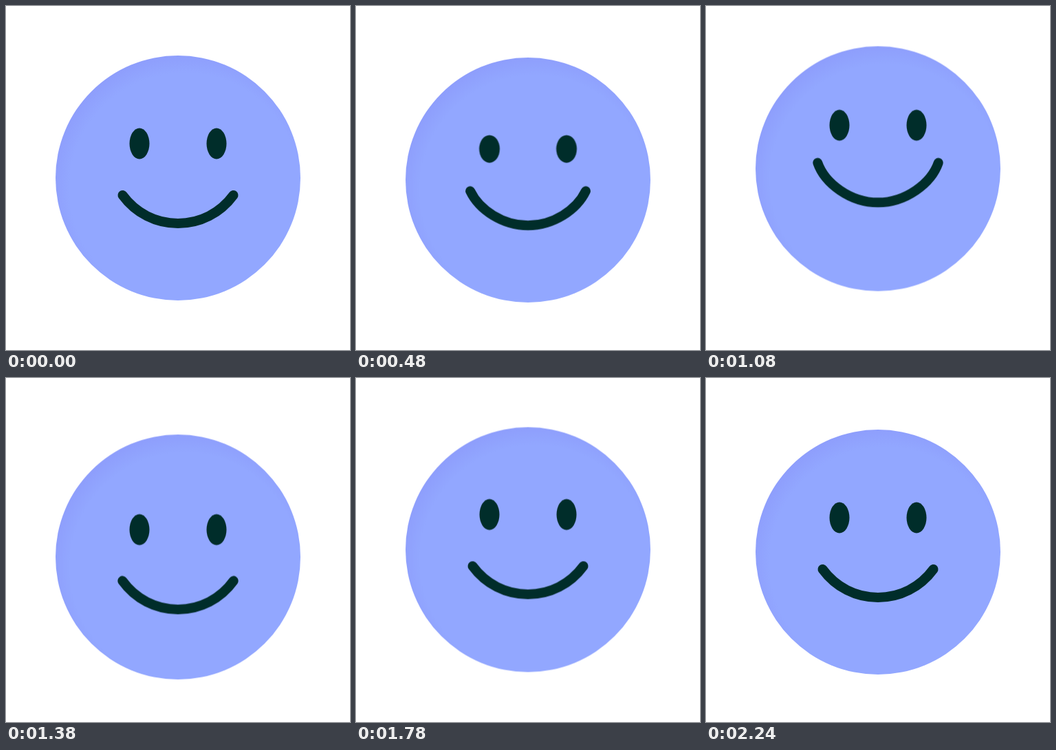
Animation of 500x500 px, one loop 2560 ms. Source, as an HTML page:

```html
<!DOCTYPE html>
<html lang="en">
<head>
<meta charset="utf-8">
<title>Bouncing smile</title>
<style>
  html, body { margin: 0; width: 100%; height: 100%; overflow: hidden; background: #fff; }
  svg { display: block; width: 100%; height: 100%; }

  .head, .face, .eye, .mouth { animation: 2560ms infinite; }
  .head { animation-name: bounce; }
  .face { animation-name: nod; }
  .eye { animation-name: blink; fill: #002d2a; }
  .left { transform-origin: 194px 219.6px; }
  .right { transform-origin: 306px 219.6px; }
  .mouth {
    animation-name: smile;
    fill: none;
    stroke: #002d2a;
    stroke-width: 14;
    stroke-linecap: round;
  }

  /* The whole ball */
  @keyframes bounce {
    0%, .78% { transform: translateY(0); animation-timing-function: cubic-bezier(.6, 0, .5, 1); }
    11.72% { transform: translateY(29.6px); animation-timing-function: cubic-bezier(.33, 0, .05, 1); }
    35.16%, 36.33% { transform: translateY(-16px); animation-timing-function: cubic-bezier(.65, 0, .65, 1); }
    55.86% { transform: translateY(11px); animation-timing-function: cubic-bezier(.33, 0, .2, 1); }
    73.44% { transform: translateY(-.9px); animation-timing-function: cubic-bezier(.33, 0, .3, 1); }
    87.5%, 100% { transform: translateY(3px); }
  }

  /* The face sliding on the ball */
  @keyframes nod {
    0%, .78% { transform: translateY(0); animation-timing-function: cubic-bezier(.6, 0, .5, 1); }
    11.72% { transform: translateY(28.6px); animation-timing-function: cubic-bezier(.33, 0, .05, 1); }
    35.16%, 36.33% { transform: translateY(-15.6px); animation-timing-function: cubic-bezier(.65, 0, .65, 1); }
    55.86% { transform: translateY(11px); animation-timing-function: cubic-bezier(.33, 0, .2, 1); }
    73.44% { transform: translateY(-1.4px); animation-timing-function: cubic-bezier(.33, 0, .3, 1); }
    87.5%, 100% { transform: translateY(0); }
  }

  @keyframes blink {
    0%, .78% { transform: scale(1, 1); animation-timing-function: cubic-bezier(.6, 0, .5, 1); }
    11.72% { transform: scale(1.25, .12); animation-timing-function: cubic-bezier(.4, 0, .2, 1); }
    23.44%, 100% { transform: scale(1, 1); }
  }

  @keyframes smile {
    0%, .78% {
      d: path("M169.5 275C188.5 301 218 316 250 316S311.5 301 330.5 275");
      animation-timing-function: cubic-bezier(.6, 0, .5, 1);
    }
    11.72% {
      d: path("M172.5 278.5C191 302 219.5 315 250 315S309 302 327.5 278.5");
      animation-timing-function: cubic-bezier(.33, 0, .05, 1);
    }
    35.16%, 36.33% {
      d: path("M161.5 252.5C171 283 209 312 250 312S329 283 338.5 252.5");
      animation-timing-function: cubic-bezier(.65, 0, .65, 1);
    }
    55.86%, 100% {
      d: path("M169.5 275C188.5 301 218 316 250 316S311.5 301 330.5 275");
    }
  }
</style>
</head>
<body>
<svg viewBox="0 0 500 500">
  <defs>
    <radialGradient id="skin" gradientUnits="userSpaceOnUse" cx="260" cy="265" r="195">
      <stop offset=".86" stop-color="#92a7ff"/>
      <stop offset="1" stop-color="#8e9efc"/>
    </radialGradient>
  </defs>
  <g class="head">
    <circle cx="250" cy="250" r="178" fill="url(#skin)"/>
    <g class="face">
      <ellipse class="eye left" cx="194" cy="200" rx="14.5" ry="22.5"/>
      <ellipse class="eye right" cx="306" cy="200" rx="14.5" ry="22.5"/>
      <path class="mouth" d="M169.5 275C188.5 301 218 316 250 316S311.5 301 330.5 275"/>
    </g>
  </g>
</svg>
</body>
</html>
```
